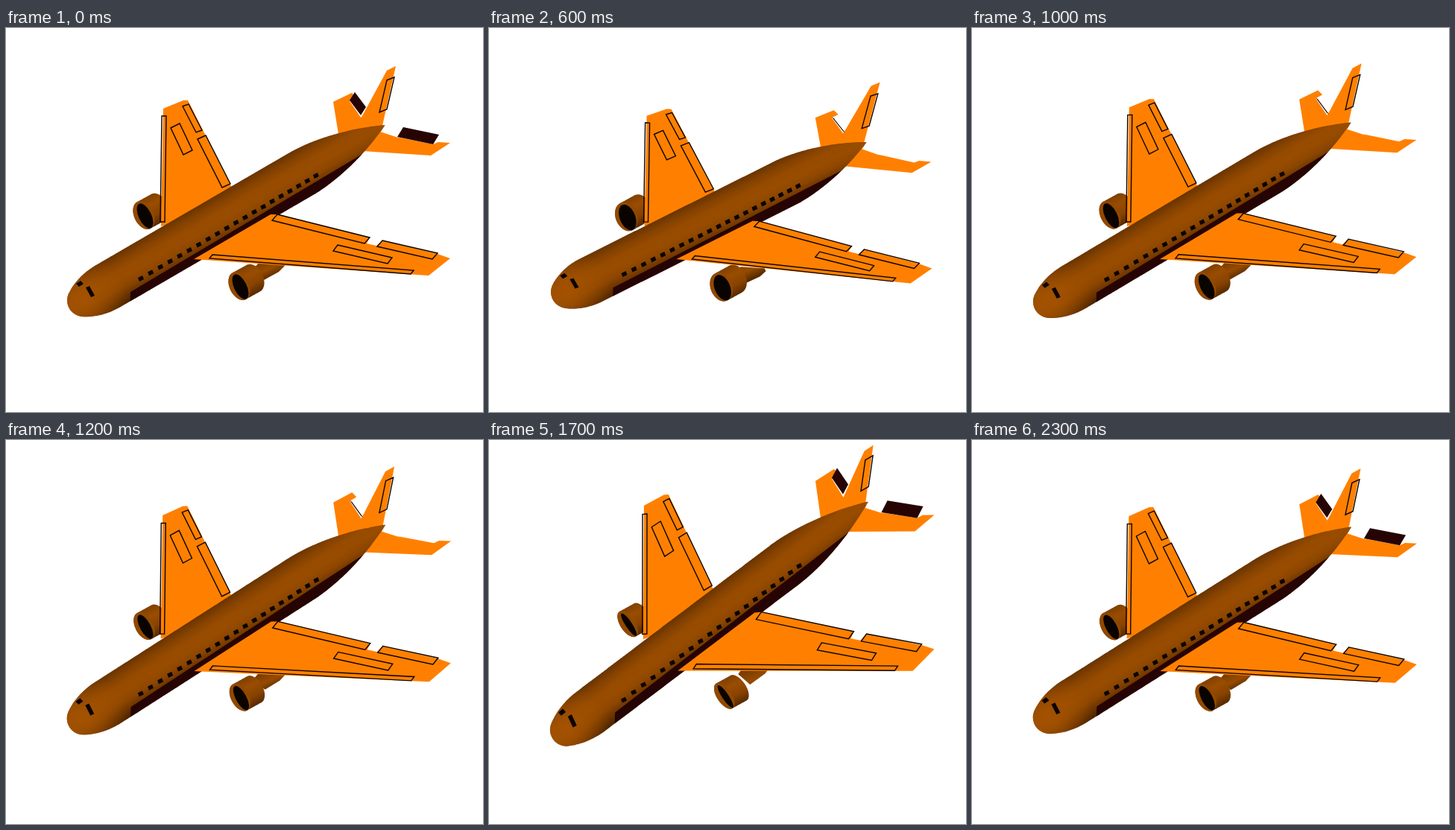
These frames come from a looping animation (640x515 px, 2.4 s). An HTML page with a canvas:

```html
<!DOCTYPE html>
<html lang="en">
<head>
<meta charset="utf-8">
<title>Airliner pitching</title>
<style>
html, body { margin: 0; width: 100%; height: 100%; overflow: hidden; background: #fff; }
canvas { display: block; }
</style>
</head>
<body>
<canvas id="stage" width="640" height="515"></canvas>
<script>
const ctx = document.getElementById('stage').getContext('2d');
const LOOP = 2400, STEP = 100;
const ORANGE = '#ff8000', DARK = '#260404', BLACK = '#0a0400';

// Screen directions of the aircraft axes at rest, seen from the pivot.
const PIVOT = { x: 237, y: 288 };
const LONG = { x: 1, y: -.581 };
const SIDE = { x: 1.177, y: .582 };
const UP = { x: .08, y: -1.31 };
const DET = LONG.x * SIDE.y - LONG.y * SIDE.x;

let sin = 0, cos = 1;

const clamp = (v) => Math.max(0, Math.min(1, v));
const lerp = (a, b, u) => a + (b - a) * clamp(u);

// The nose drops, rises past level, then sinks again at steady rates.
function pitchAngle(t) {
  if (t < 500) return lerp(0, -.082, t / 500);
  if (t < 1700) return lerp(-.082, .139, (t - 500) / 1200);
  return lerp(.139, .022, (t - 1700) / 700);
}

// 1 = fully raised, 0 = lowered
const elevator = (t) => t < 900 ? clamp((550 - t) / 350) : clamp((t - 1300) / 400);

// Rest position on screen plus body height -> pitched position on screen.
function pitch(x, y, h) {
  const rx = x - PIVOT.x - h * UP.x;
  const ry = y - PIVOT.y - h * UP.y;
  const l = (rx * SIDE.y - ry * SIDE.x) / DET;
  const a = l * (cos - 1) - h * sin;
  const c = h * (cos - 1) + l * sin;
  return [x + a * LONG.x + c * UP.x, y + a * LONG.y + c * UP.y];
}

const axis = (l) => pitch(PIVOT.x + l * LONG.x, PIVOT.y + l * LONG.y, 0);

function trace(pts, height) {
  ctx.beginPath();
  for (let i = 0; i < pts.length; i += 2) {
    const [x, y] = [pts[i], pts[i + 1]];
    ctx.lineTo(...pitch(x, y, typeof height === 'function' ? height(x, y) : height));
  }
  ctx.closePath();
}

function fill(pts, height, color) {
  trace(pts, height);
  ctx.fillStyle = color;
  ctx.fill();
}

// Parallelogram from a corner and two edge vectors
const slab = (x, y, ax, ay, bx, by) =>
  [x, y, x + ax, y + ay, x + ax + bx, y + ay + by, x + bx, y + by];

function panel(corner, height) {
  trace(slab(...corner), height);
  ctx.strokeStyle = BLACK;
  ctx.lineWidth = 1.4;
  ctx.stroke();
}

function shade(from, to, colors) {
  const g = ctx.createLinearGradient(...from, ...to);
  colors.forEach((color, i) => g.addColorStop(i / (colors.length - 1), color));
  return g;
}

function engine(x, y, h) {
  const [px, py] = pitch(x, y, h);
  const tilt = -.45 - sin;
  const oval = (cx, cy, rx, ry) => ctx.ellipse(cx, cy, rx, ry, tilt, 0, 2 * Math.PI);
  const width = 13 - sin * 22;
  ctx.save();
  ctx.translate(px, py);
  ctx.beginPath();
  for (let u = 0; u <= 1; u += .05) {
    ctx.moveTo(20 * u, -11 * u);
    oval(20 * u, -11 * u, width, 20);
  }
  ctx.fillStyle = shade([2, -26], [22, 12], ['#7c3e00', '#9a4d00', '#874300', '#532700']);
  ctx.fill();
  ctx.beginPath();
  oval(0, 0, width, 20);
  ctx.fillStyle = '#924900';
  ctx.fill();
  ctx.beginPath();
  oval(1.5, 1, 8.5 - sin * 30, 18);
  ctx.fillStyle = BLACK;
  ctx.fill();
  ctx.restore();
}

function nacelle() {
  fill([330, 325, 340, 314, 372, 315, 374, 319, 366, 327, 346, 338], -30,
    shade([345, 312], [356, 336], ['#7c3e00', '#964b00', '#532700']));
}

function farWing() {
  const h = (x, y) => 8 + .1 * (265 - y);
  fill([211, 108, 238, 97, 244, 97, 303, 214, 303, 240, 208, 266], h, ORANGE);
  panel([209, 118, 6, 0, -2, 142], h);
  panel([237, 105, 8, -3, 18, 35], h);
  panel([257, 149, 11, -5, 33, 65], h);
  panel([221, 134, 12, -6, 17, 36], h);
}

function nearWing() {
  const h = -9;
  fill([252, 310, 355, 250, 366, 250, 488, 281, 484, 289, 497, 292, 505, 285,
        579, 303, 596, 309, 567, 332], h, ORANGE);
  panel([364, 250, 124, 31, -7, 8], h);
  panel([505, 285, 74, 17, -7, 8], h);
  panel([445, 291, 73, 17, -6, 8], h);
  panel([277, 304, 270, 21, -4, 5], h);
}

function tail(raise) {
  const farH = 10, nearH = -8;
  const finH = (x, y) => (PIVOT.y - y - .581 * (x - PIVOT.x)) / 1.264;
  fill([439, 99, 464, 87, 470, 93, 461, 98, 490, 140, 446, 142], farH, ORANGE);
  fill([523, 51, 511, 57, 479, 116, 460, 146, 503, 140], finH, ORANGE);
  panel([511, 70, 10, -4, -10, 43], finH);
  fill(slab(461, 97, 15, 20, 3 + 4 * raise, 2 - 13 * raise), farH, DARK);

  fill([474, 166, 496, 137, 529, 148, 524, 146, 573, 156, 580, 153, 596, 154,
        570, 171, 478, 165], nearH, ORANGE);
  fill(slab(525, 146, 48, 10, 8 * raise, -13 * raise), nearH, DARK);
}

const RADIUS = 32.5, NOSE = -133, TAIL = 272;

function bodyRadius(l) {
  if (l < -100) return RADIUS - 10.5 * ((-100 - l) / 33) ** 2;
  return RADIUS * (1 - clamp((l - 160) / (TAIL - 160)) ** 1.7);
}

function fuselage() {
  ctx.save();
  ctx.beginPath();
  for (let l = NOSE; l <= TAIL; l += 1) {
    const [x, y] = axis(l), r = bodyRadius(l);
    ctx.moveTo(x + r, y);
    ctx.arc(x, y, r, 0, 2 * Math.PI);
  }
  ctx.clip();

  // Shading runs square to the pitched axis.
  const [cx, cy] = axis(0), [tx, ty] = axis(TAIL);
  const len = Math.hypot(tx - cx, ty - cy);
  const nx = -(ty - cy) / len * RADIUS, ny = (tx - cx) / len * RADIUS;
  ctx.fillStyle = shade([cx - nx, cy - ny], [cx + nx, cy + ny],
    ['#693400', '#854200', '#974b00', '#984c00', '#8d4600', '#6c3500', '#4a2200']);
  ctx.fillRect(0, 0, 640, 515);

  const [gx, gy] = axis(NOSE);
  const glow = ctx.createRadialGradient(gx, gy, 4, gx, gy, 60);
  glow.addColorStop(0, 'rgba(163, 82, 0, .9)');
  glow.addColorStop(1, 'rgba(163, 82, 0, 0)');
  ctx.fillStyle = glow;
  ctx.fillRect(0, 0, 640, 515);

  fill([167, 354, 480, 168, 500, 200, 256, 330, 166, 380], -16, DARK);
  ctx.restore();

  for (let i = 0; i < 20; i++) {
    const x = 181 + 13.2 * i - .044 * i * i;
    const [px, py] = pitch(x, 336 - .587 * (x - 181), 0);
    fillAt(px, py);
  }
  fill(slab(94, 343, 6, -4, 4, 4), 6, BLACK);
  fill(slab(107, 348, 5, -2, 7, 13), 8, BLACK);
}

function fillAt(x, y) {
  ctx.beginPath();
  ctx.moveTo(x - 4, y - 1);
  ctx.lineTo(x + 2, y - 4);
  ctx.lineTo(x + 4, y + 1);
  ctx.lineTo(x - 2, y + 4);
  ctx.fillStyle = BLACK;
  ctx.fill();
}

function draw(t) {
  const angle = pitchAngle(t);
  sin = Math.sin(angle);
  cos = Math.cos(angle);
  ctx.fillStyle = '#fff';
  ctx.fillRect(0, 0, 640, 515);
  engine(185, 251, -8);
  farWing();
  tail(elevator(t));
  fuselage();
  nacelle();
  engine(313, 346, -20);
  nearWing();
}

const start = performance.now();
function tick() {
  const t = (performance.now() - start) % LOOP;
  draw(Math.floor(t / STEP) * STEP);
  requestAnimationFrame(tick);
}
tick();
</script>
</body>
</html>
```
